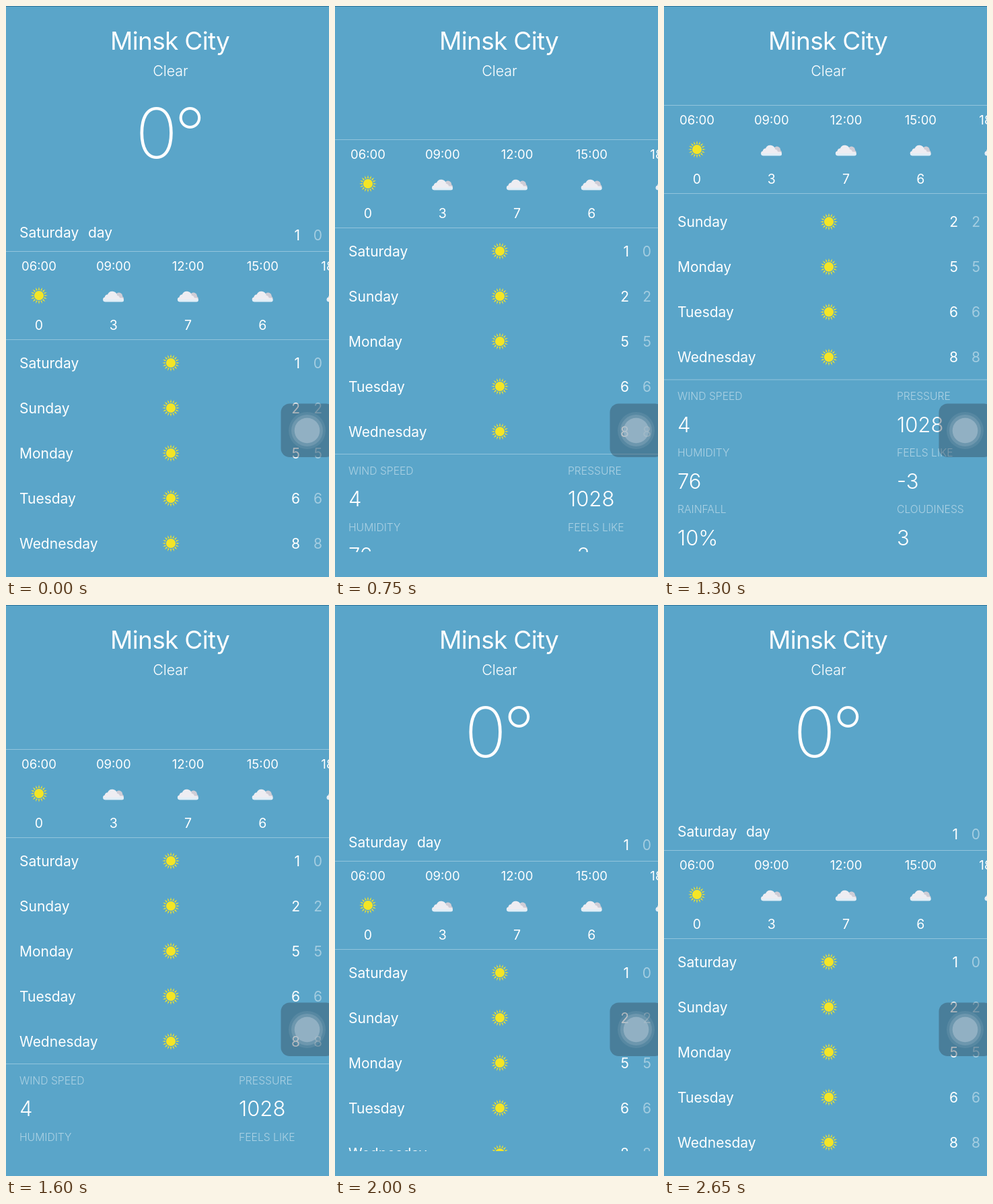
An HTML page that plays this animation: 480 px wide and 848 px high, repeating every 2.7 s.

```html
<!DOCTYPE html>
<html lang="en">
<head>
<meta charset="utf-8">
<title>Weather</title>
<style>
  html, body { margin: 0; width: 100%; height: 100%; overflow: hidden; background: #5aa5c9; }
  svg { display: block; width: 480px; height: 848px; }
  text { font-family: Inter, Roboto, sans-serif; font-size: 21px; fill: #fff; white-space: pre; }
  .mid { text-anchor: middle; }
  .end { text-anchor: end; }
  .title { font-size: 37px; letter-spacing: -.7px; }
  .sky { font-size: 21.4px; font-weight: 300; }
  .temp { font-size: 103px; font-weight: 200; }
  .hour { font-size: 18.5px; }
  .deg { font-size: 19.5px; }
  .low { fill-opacity: .45; }
  .label { font-size: 15.7px; font-weight: 300; fill-opacity: .5; }
  .value { font-size: 31px; font-weight: 300; }
  .rule { stroke: #fff; stroke-opacity: .34; }
</style>
</head>
<body>
<svg viewBox="0 0 480 848">
  <defs>
    <clipPath id="clip"><rect id="window" width="480"/></clipPath>
    <g id="sun" fill="#f4e526"><circle r="7.1"/><path id="rays"/></g>
    <g id="cloud">
      <circle cx="8" cy="1" r="5.4" fill="#cfcdd6"/>
      <circle cx="11.5" cy="4.5" r="3.6" fill="#cfcdd6"/>
      <path fill="#eeedf2" d="M-12.5 9.3a3.4 3.4 0 0 1-.6-6.7a4.6 4.6 0 0 1 4.3-4.1a7.4 7.4 0 0 1 14.2 1.6a4.6 4.6 0 0 1 3.9 3.4h3a2.9 2.9 0 0 1 0 5.8z"/>
      <path fill="#e0eef7" d="M-15.4 6h30.4a2.9 2.9 0 0 1-2.7 3.3h-24.8a3.4 3.4 0 0 1-2.9-3.3z"/>
    </g>
  </defs>
  <rect width="480" height="848" fill="#5aa5c9"/>
  <rect width="480" height="1" fill="#2a7299"/>
  <text class="title mid" x="243.6" y="65">Minsk City</text>
  <text class="sky mid" x="244.5" y="104">Clear</text>
  <g id="temp">
    <text class="temp mid" x="223.5" y="226">0</text>
    <text class="temp mid" x="273.5" y="226">°</text>
  </g>
  <g id="today"></g>
  <g clip-path="url(#clip)"><g id="list"></g></g>
  <g id="strip"></g>
  <g>
    <rect x="408.5" y="590.5" width="80" height="79.5" rx="13" fill="rgb(48,65,80)" fill-opacity=".39"/>
    <g fill="#fff">
      <circle cx="447.5" cy="630.5" r="27.5" fill-opacity=".08"/>
      <circle cx="447.5" cy="630.5" r="23.5" fill-opacity=".13"/>
      <circle cx="447.5" cy="630.5" r="18.8" fill="#a9c0d0" fill-opacity=".62"/>
    </g>
  </g>
</svg>
<script>
const LOOP = 2700, STEP = 50;
const STRIP_TOP = 364.5, STUCK_TOP = 147.5, STRIP_H = 131, LIST_END = 811;
const $ = id => document.getElementById(id);
const text = (x, y, cls, s) => `<text class="${cls}" x="${x}" y="${y}">${s}</text>`;
const rule = y => `<path class="rule" d="M0 ${y}H480"/>`;
const icon = (id, x, y) => `<use href="#${id}" x="${x}" y="${y}"/>`;
const range = (y, high, low) => text(437, y, 'end', high) + text(470, y, 'end low', low);
const clamp = v => Math.max(0, Math.min(1, v));

const polar = (r, a) => `${(r * Math.cos(a)).toFixed(2)} ${(r * Math.sin(a)).toFixed(2)}`;
let rays = '';
for (let i = 0; i < 16; i++) {
  const a = i * Math.PI / 8;
  rays += `M${polar(8.4, a - .13)}L${polar(13, a)}L${polar(8.4, a + .13)}z`;
}
$('rays').setAttribute('d', rays);

$('today').innerHTML = text(20, 343.5, '', 'Saturday') + text(122, 343.5, '', 'day') + range(347.5, 1, 0);

const hours = [['06:00', 'sun', 0], ['09:00', 'cloud', 3], ['12:00', 'cloud', 7], ['15:00', 'cloud', 6], ['18:00', 'cloud', 4]];
$('strip').innerHTML = rule(364.5) + rule(495.5) + hours.map(([hour, sky, deg], i) => {
  const x = 49 + i * 110.8;
  return text(x, 392.6, 'hour mid', hour) + icon(sky, x, 430) + text(x, 481.2, 'deg mid', deg);
}).join('');

const days = [['Saturday', 1, 0], ['Sunday', 2, 2], ['Monday', 5, 5], ['Tuesday', 6, 6], ['Wednesday', 8, 8]];
const facts = [
  ['WIND SPEED', '4', 'PRESSURE', '1028'],
  ['HUMIDITY', '76', 'FEELS LIKE', '-3'],
  ['RAINFALL', '10%', 'CLOUDINESS', '3']
];
$('list').innerHTML = days.map(([day, high, low], i) => {
  const y = 530 + i * 67;
  return text(20, y + 7.6, '', day) + icon('sun', 245, y) + range(y + 7.6, high, low);
}).join('') + rule(831.5) + facts.map(([a, b, c, d], i) => {
  const y = 861.5 + i * 84;
  return text(20, y, 'label', a) + text(20, y + 47.7, 'value', b) +
    text(346, y, 'label', c) + text(346, y + 47.7, 'value', d);
}).join('');

// Scroll offset over time: flick up past the end, settle, flick back past the top.
const keys = [[0, 0], [550, 0], [650, 62], [750, 166], [850, 244], [950, 292], [1050, 307],
  [1150, 296], [1250, 281], [1350, 274], [1450, 273], [1500, 258], [1600, 150], [1700, 56],
  [1800, 0], [1900, -20], [2000, -16], [2150, -5], [2300, 0], [2700, 0]];
const secant = i => (keys[i + 1][1] - keys[i][1]) / (keys[i + 1][0] - keys[i][0]);
const slopes = keys.map((_, i) => {
  if (!i || i === keys.length - 1) return 0;
  const a = secant(i - 1), b = secant(i);
  return a * b > 0 ? 2 * a * b / (a + b) : 0;
});

function scrollAt(t) {
  let i = 0;
  while (t >= keys[i + 1][0]) i++;
  const [t0, a] = keys[i], [t1, b] = keys[i + 1];
  const d = t1 - t0, u = (t - t0) / d, v = 1 - u;
  return a * v * v * (1 + 2 * u) + b * u * u * (3 - 2 * u) +
    d * u * v * (slopes[i] * v - slopes[i + 1] * u);
}

const shift = (id, y) => $(id).setAttribute('transform', `translate(0 ${y.toFixed(2)})`);

function draw() {
  const t = Math.floor(performance.now() % LOOP / STEP) * STEP;
  const s = scrollAt(t);
  const top = Math.max(STUCK_TOP, STRIP_TOP - s);
  const bottom = top + STRIP_H;
  shift('list', -s);
  shift('today', -s);
  shift('strip', top - STRIP_TOP);
  $('window').setAttribute('y', bottom);
  $('window').setAttribute('height', LIST_END - bottom);
  $('temp').setAttribute('opacity', clamp(1 - s / 110));
  $('today').setAttribute('opacity', clamp(1 - s / 70));
  requestAnimationFrame(draw);
}
draw();
</script>
</body>
</html>
```
